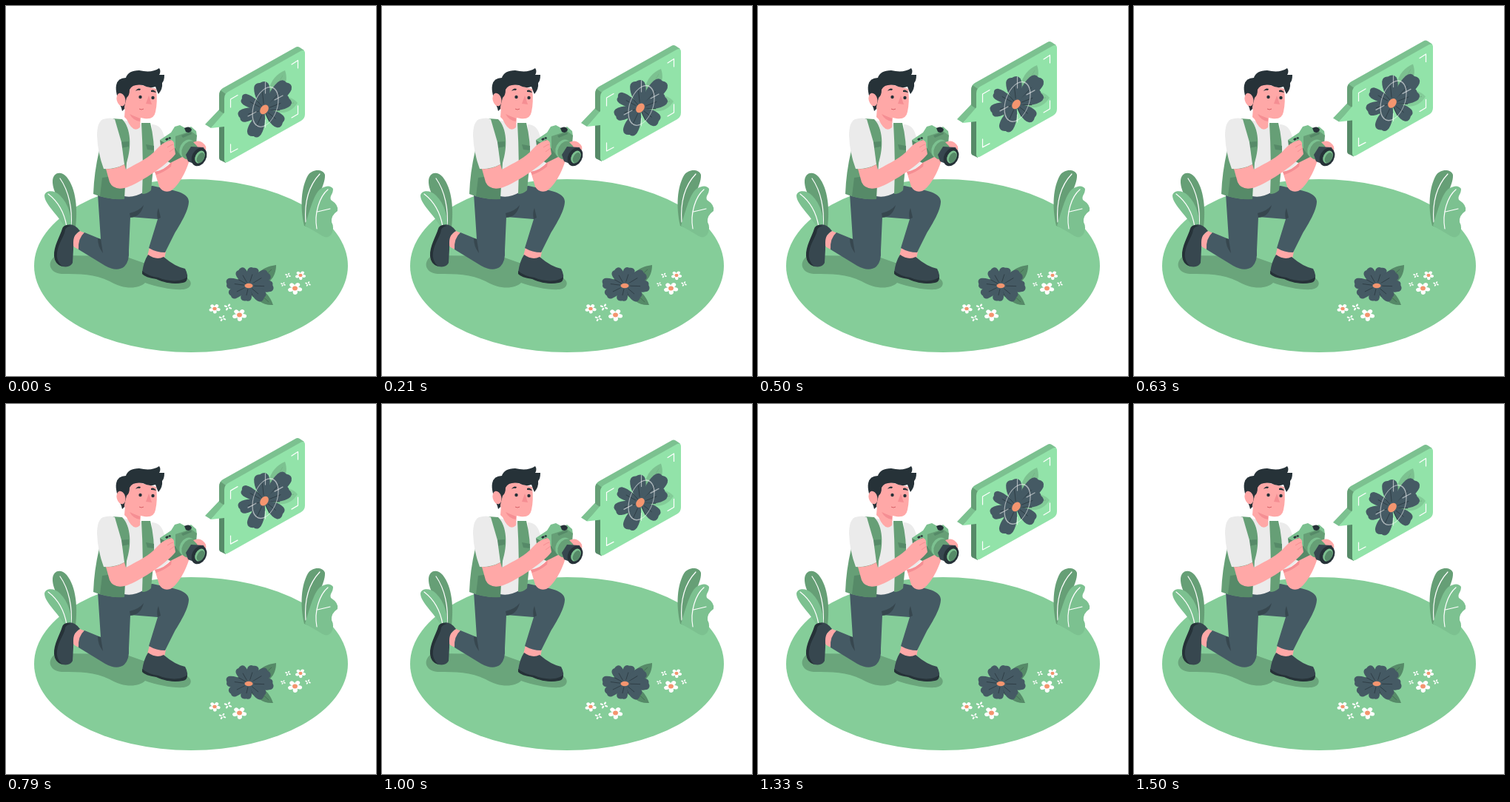
These frames come from a looping animation (500x500 px, 1.54 s). An HTML page:

```html
<!DOCTYPE html>
<html lang="en">
<head>
<meta charset="utf-8">
<title>Flower photographer</title>
<style>
  html, body { margin: 0; width: 100%; height: 100%; overflow: hidden; background: #fff; }
  svg { display: block; width: 100vw; height: 100vh; }
  .line { fill: none; stroke: #fff; stroke-width: 1.2; stroke-linecap: round; stroke-linejoin: round; }
  .skin { fill: #ffa8a7; }
  .ink { fill: #263238; }
  .slate { fill: #455a64; }
  .shoe { fill: #37474f; }
  .cloth { fill: #ebebeb; }
  .deep { fill: #568a68; }
  .moss { fill: #669f76; }
  .mid { fill: #7cc190; }
</style>
</head>
<body>
<svg viewBox="0 0 500 500">
  <ellipse cx="250" cy="351" rx="212" ry="117" fill="#85cd99"/>

  <g id="plants">
    <path class="moss" d="M84 300C79 272 62 252 63 236C64 224 75 223 82 231C95 247 97 275 94 300Z"/>
    <path class="line" d="M73 233C85 250 90 275 88 298"/>
    <path class="mid" d="M80 299C68 280 52 267 52 256C54 248 66 249 73 256C85 268 89 285 88 300Z"/>
    <path class="line" d="M57 254C70 264 79 280 82 298"/>
    <path class="moss" d="M403 297C397 270 399 245 408 229C414 220 428 220 431 228C432 245 415 260 411 300Z"/>
    <path class="line" d="M424 227C409 243 403 266 405 292"/>
    <path class="mid" d="M404 297C409 282 415 255 425 247Q437 240 442 247C442 255 437 256 439 262Q450 269 448 277Q439 283 440 292Q444 299 440 308Q435 315 428 311Q415 303 404 297Z"/>
    <path class="line" d="M420 301C416 280 424 257 435 248M421 278L438 274"/>
  </g>

  <path fill="#6aa57b" d="M68 337C55 345 57 360 75 362C100 362 120 362 140 372C160 384 180 382 188 374C205 380 225 384 240 383C252 381 252 372 245 368L160 338Z"/>

  <g id="legs">
    <path class="skin" d="M100 304L107 307 100 329Q90 327 89 319Q92 308 100 304Z"/>
    <path class="shoe" d="M82 296Q92 293 100 304C88 311 92 320 91 329L90 347Q87 354 76 352Q64 348 66 334C68 320 75 310 78 300Z"/>
    <path class="ink" d="M82 296Q77 297 76 301C73 311 64 325 65 338Q66 349 76 352Q67 344 69 333C71 319 79 312 80 302Q82 298 88 297Z"/>
    <path class="skin" d="M194 326L216 332 214 341Q203 346 191 338Z"/>
    <path class="shoe" d="M192 336Q203 344 213 339Q228 352 242 355Q247 364 244 371C238 376 220 376 205 369Q190 366 184 360Q186 345 192 336Z"/>
    <path class="ink" d="M184 358Q192 365 206 367C220 373 238 373 245 366Q245 373 239 374C222 377 210 372 203 369Q188 367 184 362Z"/>
    <path class="slate" d="M124 254L128 315 106 306Q97 314 98 329L134 351Q150 360 160 352Q167 345 166 330L168 285 205 288 193 327Q203 333 215 333L228 307C236 294 247 276 247 264C246 250 222 249 198 243Z"/>
    <path class="shoe" d="M186 269Q180 277 167 280L168 286Q182 285 186 269M124 314L128 315 131 334Q124 325 124 314M205 288Q203 280 206 273L209 286Z"/>
  </g>

  <g id="torso">
    <path class="cloth" d="M157 154L184 160 187 251Q172 260 160 257Z"/>
    <path class="cloth" d="M197 160Q209 160 213 174L224 208Q214 222 202 224L197 190Z"/>
    <path class="moss" d="M183 158L195 158Q201 182 200 208L196 249Q191 254 184 254Q186 210 183 158Z"/>
    <path class="deep" d="M189 187L200 189 200 195 191 194Z"/>
    <path class="moss" d="M144 152L157 153C169 165 170 190 163 212L160 261Q137 262 118 254Q119 225 126 195Z"/>
    <path class="deep" d="M130 232L160 228 160 261Q143 262 127 257ZM152 184L166 183 166 190 155 192Z"/>
    <path class="cloth" d="M131 153Q142 150 147 153L156 184 160 214Q147 221 132 220Q124 199 123 175Q123 157 131 153Z"/>
    <path class="skin" d="M161 137L182 151 181 164Q172 173 163 153L160 150Z"/>
    <path fill="#f58e93" d="M167 146L181 152 181 156Q172 155 167 146Z"/>
  </g>

  <g id="head">
    <path class="skin" d="M157 124L172 104 203 112Q205 130 202 143Q200 154 187 152Q169 150 160 139Z"/>
    <path class="ink" d="M156 138Q147 117 149 107Q151 97 162 97Q165 87 180 87Q197 91 207 84Q210 88 207 93L214 93Q214 101 211 104Q212 112 206 119Q204 115 202 109Q194 112 185 107Q171 105 167 113Q167 121 163 124L160 136 160 139 157 142Z"/>
    <ellipse class="skin" cx="155.500" cy="126.500" rx="5.800" ry="9" transform="rotate(-15 155.500 126.500)"/>
    <path fill="#f58e93" d="M193 121L197 133 189 132Z"/>
    <circle class="ink" cx="181.500" cy="123" r="2.200"/>
    <circle class="ink" cx="198.500" cy="124" r="2.200"/>
    <path class="ink" d="M175 115Q178 110 182 112L181 114Q178 113 175 115M196 114Q200 112 203 117Q199 116 196 116Z"/>
    <path fill="none" stroke="#d65e66" d="M180 139Q183 141 186 139"/>
  </g>

  <g id="camera">
    <path class="skin" d="M201 224Q214 222 224 210L237 202 244 190 258 183Q272 186 270 194L247 211C243 225 232 245 222 250Q212 253 207 244Z"/>
    <path fill="#f58e93" d="M201 224Q213 223 224 211L223 217Q213 225 203 228Z"/>
    <path class="deep" d="M208 181L222 188 240 174 257 170 257 184 240 203 222 212 211 206Z"/>
    <path class="mid" d="M208 181L223 171 228 163 235 161 244 166 250 163 257 169 258 176 240 182 230 193 222 189Z"/>
    <path class="moss" d="M229 176L250 169 258 175 257 187 237 204 229 193Z"/>
    <path class="ink" d="M241 165Q248 161 251 167Q249 173 243 170Z"/>
    <path class="deep" d="M237 175L250 170 251 173 239 178Z"/>
    <path class="ink" d="M215 180l3-2 2 2-3 2zm4 3l3-2 2 2-3 2zm0-5l3-1 1 2-2 1z"/>
    <ellipse class="mid" cx="245" cy="193" rx="10" ry="13" transform="rotate(28 245 193)"/>
    <ellipse class="moss" cx="248" cy="195" rx="10" ry="13" transform="rotate(28 248 195)"/>
    <path class="skin" d="M253 184Q262 180 267 186Q271 189 270 195L260 191Z"/>
    <path class="shoe" d="M250 190L267 191 271 202 261 216 246 210 243 201Z"/>
    <ellipse class="ink" cx="261" cy="204" rx="9.500" ry="13" transform="rotate(28 261 204)"/>
    <ellipse class="mid" cx="262" cy="204" rx="6" ry="9" transform="rotate(28 262 204)"/>
    <ellipse class="deep" cx="263" cy="205" rx="4.500" ry="7.500" transform="rotate(28 263 205)"/>
    <path class="skin" d="M135 220Q148 221 160 214L162 221C180 211 194 205 204 193Q212 184 223 181Q228 183 227 188L229 200C218 215 175 243 160 246Q145 249 140 238Z"/>
    <path fill="none" stroke="#f58e93" d="M218 191Q224 187 226 187M221 197L228 192"/>
  </g>

  <g id="meadow">
    <path class="deep" d="M333 375C338 358 351 352 365 350C365 367 355 379 333 379ZM332 382C347 379 357 392 361 404C348 405 338 399 332 382Z"/>
    <path fill="none" stroke="#466f55" d="M338 375L359 356M340 386L355 400"/>
  </g>

  <g id="bubble">
    <path class="mid" d="M288 121Q288 114 293 111L391 56Q394 54 397 56L403 60 296 125 295 146 277 165 269 160 288 140Z"/>
    <path class="deep" d="M288 160V205Q288 208 291 209L297 212 300 160Z"/>
    <path class="moss" d="M288 121Q288 117 290 114L297 119 295 146 288 141Z"/>
    <path fill="#92e3a9" d="M295 125Q295 119 300 116L398 61Q404 58 404 64V146Q404 152 399 155L301 210Q295 214 295 207V163L277 165 295 144Z"/>
    <path class="mid" d="M355 116C357 100 367 91 377 87C381 99 379 109 365 124Z"/>
    <path fill="#83cc98" d="M365 123C378 120 388 124 394 131C386 143 375 147 361 142Z"/>
    <path fill="none" stroke="#75b687" d="M362 115L374 94M368 134L389 131"/>
    <g id="portrait"></g>
    <g class="line">
      <path d="M303.500 137V126L313 120.500M303.500 187V198L313 193M386 79L394.500 73.500V84M394.500 135V146L386 151"/>
      <g stroke-opacity=".55">
        <ellipse rx="17.500" ry="25" transform="translate(350.500 136.500) skewY(-29)"/>
        <path d="M350.500 103V118M350.500 154V164M327 149L338 143M363 127L374 121"/>
      </g>
    </g>
  </g>
</svg>
<script>
  const $ = id => document.getElementById(id);
  const draw = (id, markup) => $(id).insertAdjacentHTML('beforeend', markup);

  // Each petal is a unit shape turned and stretched towards its tip.
  function bloom(id, x, y, petals, heart) {
    const parts = petals.map(([dx, dy, k]) => {
      const turn = `transform="matrix(${dx} ${dy} ${-dy * k} ${dx * k} 0 0)"`;
      return `<path class="slate" ${turn} d="M0 0C.2-.22 .5-.46 .8-.4Q.98-.34 .95-.08Q1.05 .2 .9 .34C.62 .5 .22 .24 0 0"/>
        <path ${turn} d="M.2 0L.62 0M.1 .1L.5 .36" fill="none" stroke="#2f3e46" vector-effect="non-scaling-stroke"/>`;
    });
    draw(id, `<g transform="translate(${x} ${y})">${parts.join('')}
      <ellipse fill="#f4956f" ${heart}/></g>`);
  }

  function daisy(x, y, r, petals, heart) {
    let s = '';
    for (let i = 0; i < petals; i++) {
      const angle = i * 360 / petals + (petals === 4 ? 25 : 15);
      s += `<ellipse cx="${r * .62}" rx="${r * .42}" ry="${r * (petals === 4 ? .25 : .33)}" transform="rotate(${angle})"/>`;
    }
    if (heart) s += `<circle r="${r * .36}" fill="#f4956f"/>`;
    draw('meadow', `<g fill="#fff" transform="translate(${x} ${y}) scale(1 .85)">${s}</g>`);
  }

  bloom('portrait', 349, 140, [
    [-4, -38, .7], [33, -37, .56], [36, -14, .6], [25, 20, .75],
    [-17, 37, .62], [-35, 10, .62], [-31, -17, .55]
  ], 'rx="5" ry="7" transform="rotate(38)"');

  bloom('meadow', 328, 378, [
    [-13, -23, .75], [8, -25, .75], [28, -17, .65], [34, 1, .6],
    [21, 18, .75], [-5, 21, .85], [-26, 13, .65], [-31, -4, .6]
  ], 'rx="5.500" ry="3.300"');

  [[282, 409, 7.5], [315.500, 417.500, 9.500], [390.500, 381.500, 9.500], [398, 364, 7]]
    .forEach(([x, y, r]) => daisy(x, y, r, 5, true));
  [[300, 407, 5.5], [292.500, 422, 5], [381, 364, 4], [374.500, 376, 3.5], [408, 375.500, 4]]
    .forEach(([x, y, r]) => daisy(x, y, r, 4));

  const LOOP = 1540, PEAK = 735, LIFT = 9;
  function tick(now) {
    const phase = (now % LOOP - PEAK) / LOOP * 2 * Math.PI;
    const y = -LIFT * (1 + Math.cos(phase)) / 2;
    $('bubble').setAttribute('transform', `translate(0 ${y.toFixed(2)})`);
    requestAnimationFrame(tick);
  }
  tick(0);
</script>
</body>
</html>
```
